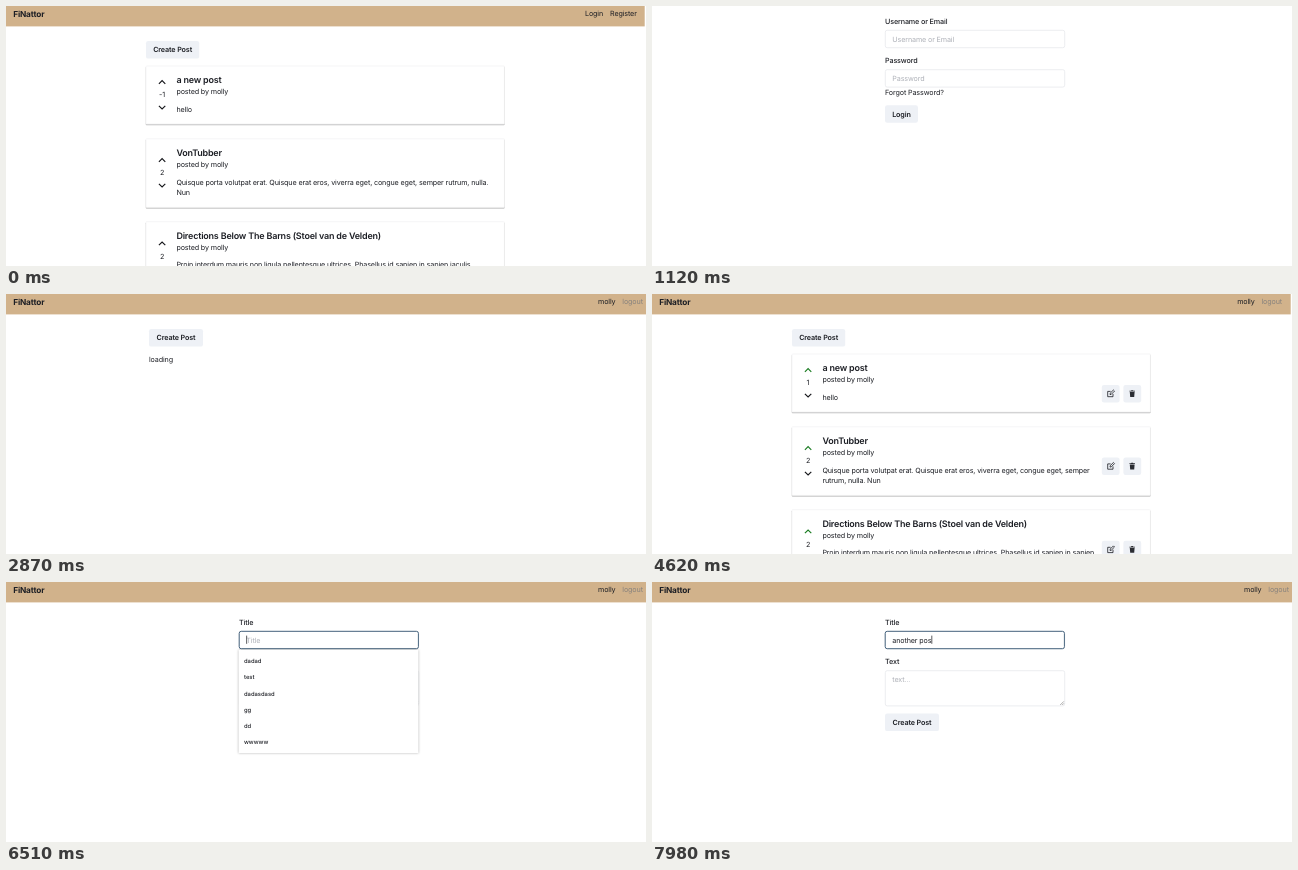
An HTML page that plays this animation: 640 px wide and 260 px high, repeating every 8 s.

```html
<!DOCTYPE html>
<html lang="en">
<head>
<meta charset="utf-8">
<title>Forum demo</title>
<style>
html, body { margin: 0; width: 100%; height: 100%; overflow: hidden; background: #fff; }
svg { display: block; width: 640px; height: 260px; }
text {
  font: 400 7.18px Inter, "Liberation Sans", sans-serif;
  letter-spacing: -.018em; white-space: pre; fill: #1c1e24;
  text-rendering: geometricPrecision;
}
.logo { font-weight: 700; font-size: 8.25px; }
.title { font-weight: 600; font-size: 8.98px; letter-spacing: -.021em; }
.semi { font-weight: 600; }
.label { font-weight: 500; }
.item { font-weight: 500; font-size: 5.85px; letter-spacing: 0; }
.mid { text-anchor: middle; }
.hint { fill: #aeb1b8; }
.off { fill: #87827d; }
.btn { fill: #eef1f6; }
.box { fill: #fff; stroke: #e4e6ea; stroke-width: .7; }
.fill { fill: #e6effd; }
.ring { fill: none; stroke: #48657f; stroke-width: 1; }
.card { fill: #fff; stroke: #eeeff0; stroke-width: .6; filter: drop-shadow(0 1px .5px rgba(0,0,0,.22)); }
.menu { fill: #fff; filter: drop-shadow(0 .7px 1.2px rgba(0,0,0,.33)); }
.line { fill: none; stroke-width: 1.15; }
.thin { fill: none; stroke: #1c1e24; stroke-width: .8; }
</style>
</head>
<body>
<svg id="stage" viewBox="0 0 640 260"></svg>
<script>
const LOOP = 8000, STEP = 70;
const SITE = 'FiNattor', USER = 'molly';
const BLACK = '#15161a', GREEN = '#1b7c22', RED = '#e8291c';

// Key moments in ms
const HOVER_LOGIN = 910, LOGIN = 1120, AUTOFILL = 1470, SUBMIT = 2660, LOADING = 2870,
  FEED = 2940, VOTE = 4620, HOVER_CREATE = 5180, CREATE = 5670,
  FOCUS = 6440, MENU = 6510, BLINK = 6930, TYPE = 7070;
const TYPED = 'another pos';
const KEYS = [7070, 7140, 7210, 7350, 7420, 7490, 7560, 7630, 7700, 7910, 7980];

const text = (x, y, s, cls = '') => `<text x="${x}" y="${y}" class="${cls}">${s}</text>`;
const rect = (x, y, w, h, cls, r = 0, extra = '') =>
  `<rect x="${x}" y="${y}" width="${w}" height="${h}" rx="${r}" class="${cls}" ${extra}/>`;
const bar = (x, y, w) => rect(x, y, w, .6, '', 0, `fill="${BLACK}"`);
const during = (from, to, body) => `<g data-from="${from}" data-to="${to}">${body}</g>`;

const header = (width, links) =>
  rect(0, 0, width, 20.4, '', 0, 'fill="#d1b28b"') + text(7.2, 10.8, SITE, 'logo') + links;
const account = x => text(x, 10.4, USER) + text(x + 24.3, 10.4, 'logout', 'off');
const button = (x, y, w, label) =>
  rect(x, y, w, 17.6, 'btn', 2.2) + text(x + w / 2, y + 11.4, label, 'semi mid');
const field = (y, label, hint, h = 17.4) =>
  text(233, y - 6.5, label, 'label') + rect(233.3, y + .3, 179.4, h, 'box', 1.9) +
  (hint ? text(240.3, y + 11.6, hint, 'hint') : '');

const chevron = (y, dir, color) =>
  `<path class="line" stroke="${color}" d="M152.9 ${y + dir * 1.6}l3.2 ${-dir * 3.2}l3.2 ${dir * 3.2}"/>`;
const votes = (y, n, up = BLACK, down = BLACK) =>
  chevron(y - 12.8, 1, up) + text(156, y + 2.4, n, 'mid') + chevron(y + 12.4, -1, down);

function card(top, h, title, lines) {
  return rect(140, top, 358.4, h, 'card', .6) + text(170.4, top + 17.3, title, 'title') +
    text(170.4, top + 28.1, 'posted by ' + USER) +
    lines.map((s, i) => text(170.4, top + 45.7 + i * 10.8, s)).join('');
}
const tools = y => rect(449.8, y - 8.8, 17.8, 17.6, 'btn', 2.2) + rect(471.4, y - 8.8, 17.8, 17.6, 'btn', 2.2) +
  `<path class="thin" d="M458.6 ${y - 2.3}h-2.9v5.3h5.3v-2.8M458 ${y + .9}l.2-1.4 3.2-3.2 1.1 1.1-3.2 3.2z"/>` +
  `<path fill="#2b2d33" d="M477.4 ${y - 2.9}h1.6l.4-.6h1.6l.4.6h1.6v.8h-5.6zM477.8 ${y - 1.7}h4.8l-.4 4.9h-4z"/>`;

function feed(intro, latin) {
  return button(140, 35, 53.2, 'Create Post') +
    card(60, 58, 'a new post', ['hello']) +
    card(132.8, 68.6, 'VonTubber', intro) +
    card(215.7, 68.6, 'Directions Below The Barns (Stoel van de Velden)', [latin]);
}
const quis = 'Quisque porta volutpat erat. Quisque erat eros, viverra eget, congue eget, semper';
const proin = 'Proin interdum mauris non ligula pellentesque ultrices. Phasellus id sapien in sapien';

const guestHome =
  header(638.7, text(579, 10.4, 'Login') + text(604, 10.4, 'Register')) +
  feed([quis + ' rutrum, nulla.', 'Nun'], proin + ' iaculis') +
  votes(89, '-1') + votes(167, '2') + votes(250.4, '2') +
  during(HOVER_LOGIN, LOGIN, bar(579, 11.7, 18));

const dots = [0, 1, 2, 3].map(i => `<circle cx="${242 + i * 3.2}" cy="72.6" r=".95" fill="${BLACK}"/>`).join('');
const loginPage =
  field(24, 'Username or Email') + field(63.4, 'Password') +
  during(LOGIN, AUTOFILL, text(240.3, 35.6, 'Username or Email', 'hint') + text(240.3, 75, 'Password', 'hint')) +
  during(AUTOFILL, LOADING,
    `<g id="autofill">${rect(233, 24, 180, 17.8, 'fill', 2)}${rect(233, 63.4, 180, 17.8, 'fill', 2)}</g>` +
    text(240.3, 35.6, USER) + dots) +
  text(233, 89.4, 'Forgot Password?') +
  rect(233, 99.2, 33, 17.6, 'btn', 2.2) +
  during(LOGIN, SUBMIT, text(249.4, 110.7, 'Login', 'semi mid')) +
  during(SUBMIT, LOADING,
    '<path id="spinner" d="M-2.26-2.26A3.2 3.2 0 0 1 2.26 2.26" fill="none" stroke="#70757e" stroke-width=".9"/>');

const loadingPage = header(640, account(592)) + button(143, 35, 54, 'Create Post') + text(143, 67.7, 'loading');

const userHome =
  header(638.7, account(585.2)) +
  feed([quis, 'rutrum, nulla. Nun'], proin) +
  [99.7, 172.2, 255.6].map(tools).join('') +
  during(FEED, VOTE, votes(89, '-1', BLACK, RED)) +
  during(VOTE, CREATE, votes(89, '1', GREEN)) +
  votes(167, '2', GREEN) + votes(250.4, '2', GREEN) +
  during(HOVER_CREATE, CREATE, bar(146.8, 46.9, 39.8));

const words = ['dadad', 'test', 'dadasdasd', 'gg', 'dd', 'wwwww'];
const createPage =
  header(640, account(592)) +
  field(49.2, 'Title') + field(88.4, 'Text', 'text...', 35.2) +
  '<path d="M408.2 123l3.6-3.6M410.2 123l1.6-1.6" stroke="#777" stroke-width=".6"/>' +
  button(233, 131.5, 54, 'Create Post') +
  during(CREATE, TYPE, text(240.3, 60.7, 'Title', 'hint')) +
  during(FOCUS, LOOP, `<g id="ring">${rect(233.2, 49.3, 179.2, 17.4, 'ring', 2)}</g>`) +
  '<text id="typed" x="240.3" y="60.7"></text>' +
  `<rect id="caret" y="53.6" width=".7" height="8.2" fill="${BLACK}"/>` +
  during(MENU, TYPE, rect(232.6, 67.9, 179.8, 103.2, 'menu') +
    words.map((w, i) => text(238, 81.1 + i * 16.2, w, 'item')).join(''));

const stage = document.getElementById('stage');
stage.innerHTML =
  during(0, LOGIN, guestHome) + during(LOGIN, LOADING, loginPage) +
  during(LOADING, FEED, loadingPage) + during(FEED, CREATE, userHome) +
  during(CREATE, LOOP, createPage);

const parts = [...stage.querySelectorAll('[data-from]')].map(el =>
  ({ el, from: +el.dataset.from, to: +el.dataset.to }));
const [autofill, spinner, ring, typed, caret] =
  ['autofill', 'spinner', 'ring', 'typed', 'caret'].map(id => document.getElementById(id));

function draw(t) {
  for (const { el, from, to } of parts) el.style.display = t >= from && t < to ? '' : 'none';
  autofill.style.opacity = t < AUTOFILL + STEP ? .5 : 1;
  ring.style.opacity = t < FOCUS + STEP ? .5 : 1;

  const turn = Math.floor((t - SUBMIT) / STEP) * STEP / 650 * 360;
  spinner.setAttribute('transform', `translate(249.6 108) rotate(${turn})`);

  const value = TYPED.slice(0, KEYS.filter(k => k <= t).length);
  if (typed.textContent !== value) typed.textContent = value;
  const blinkOn = t >= FOCUS && t < BLINK || t >= TYPE;
  caret.style.display = blinkOn ? '' : 'none';
  caret.setAttribute('x', 240.4 + (value ? typed.getComputedTextLength() : 0));
}

const start = performance.now();
function tick() {
  draw((performance.now() - start) % LOOP);
  requestAnimationFrame(tick);
}
tick();
</script>
</body>
</html>
```
